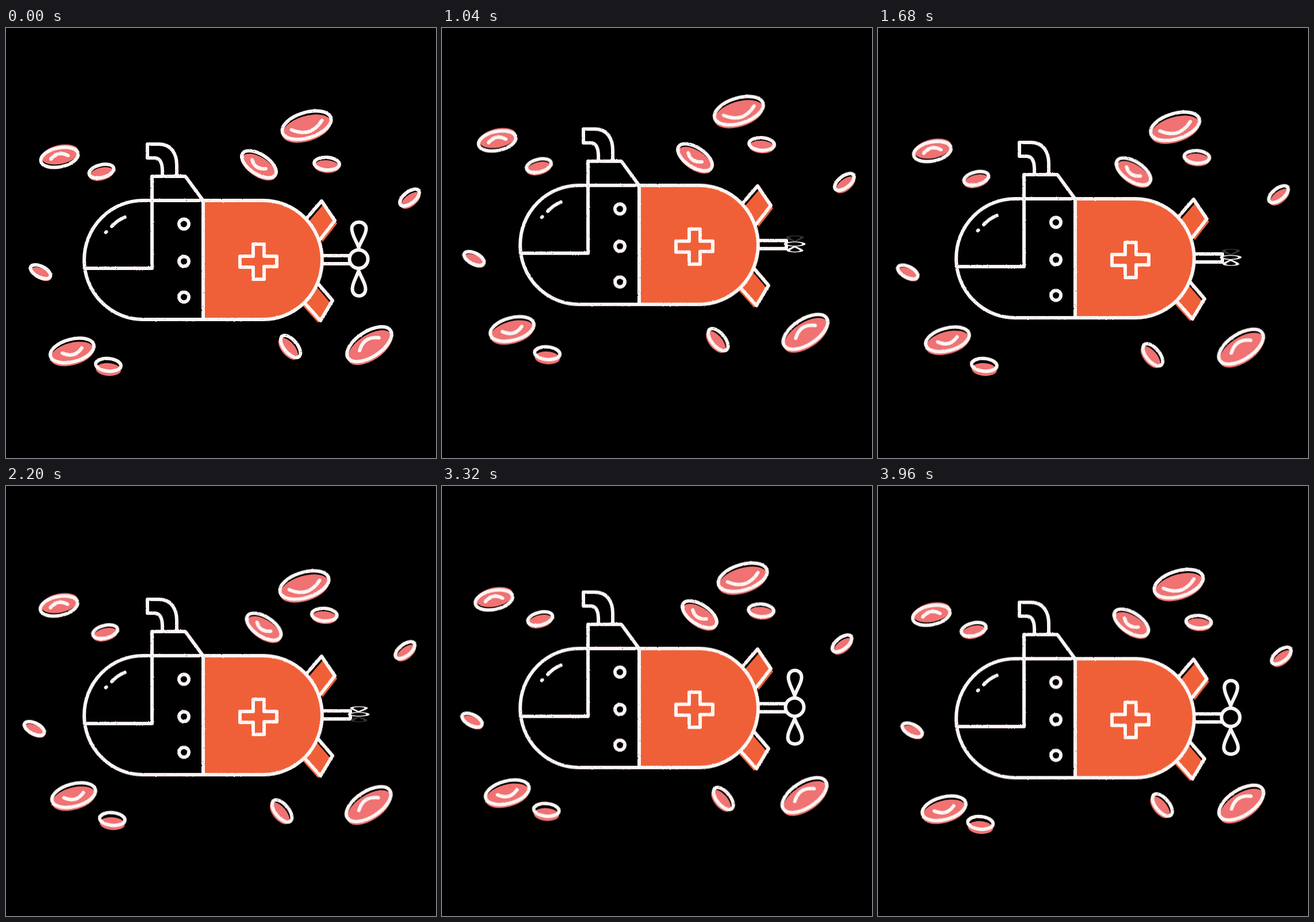
Recreate the animation shown at these times as an HTML page. Size 748 px wide and 748 px high, loop 4 s.

```html
<!DOCTYPE html>
<html lang="en">
<head>
<meta charset="utf-8">
<title>Submarine</title>
<style>
  html, body { margin: 0; width: 100%; height: 100%; overflow: hidden; background: #000; }
  #stage { position: absolute; inset: 0; overflow: hidden; contain: strict; }
  svg { position: absolute; left: 0; top: 0; width: 748px; height: 748px; }
  .layer { will-change: transform; }
  .line { fill: none; stroke: #fdf6f5; stroke-width: 6; stroke-linejoin: round; stroke-linecap: round; }
  .chalk { filter: url(#chalk); }
  .orange { fill: #f06038; }
  .pink { fill: #f07272; }
</style>
</head>
<body>
<div id="stage">
<svg viewBox="0 0 748 748">
  <filter id="chalk" x="-20%" y="-20%" width="140%" height="140%" color-interpolation-filters="sRGB">
    <feTurbulence type="fractalNoise" baseFrequency=".3" numOctaves="2" seed="4" result="wobble"/>
    <feDisplacementMap in="SourceGraphic" in2="wobble" scale="2" xChannelSelector="R" yChannelSelector="G" result="rough"/>
    <feTurbulence type="fractalNoise" baseFrequency=".55" numOctaves="2" seed="9"/>
    <feColorMatrix values="0 0 0 0 0  0 0 0 0 0  0 0 0 0 0  10 0 0 0 -7.4" result="grain"/>
    <feComposite in="rough" in2="grain" operator="out"/>
  </filter>
</svg>
</div>
<script>
const LOOP = 4000, STEP = 40, SPIN_STEPS = 16;
const stage = document.getElementById('stage');

function layer(markup, cls = 'layer') {
  stage.insertAdjacentHTML('beforeend', `<svg viewBox="0 0 748 748" class="${cls}">${markup}</svg>`);
  return stage.lastElementChild;
}

const line = d => `<path d="${d}"/>`;
const porthole = y => `<circle cx="309.5" cy="${y}" r="8.5"/>`;

const topFin = 'M523 331 L549 301 L572 335 L547 367';
const lowFin = 'M544 446 L568 474 L547 509 L520 479';

const sub = layer(`
  <g class="orange">
    <path d="${topFin}" transform="translate(4 5)"/>
    <path d="${lowFin}" transform="translate(-4 4)"/>
  </g>
  <g class="line chalk">${line(topFin)}${line(lowFin)}</g>
  <path class="orange" d="M345 300 H448 A102 103.5 0 0 1 448 507 H345Z"/>
  <g class="line chalk">
    ${line('M238 300 H448 A102 103.5 0 0 1 448 507 H238 A102 103.5 0 0 1 238 300Z')}
    ${line('M343 301 V506')}
    ${line('M138 418 H254 V258 H312 L342 299')}
    ${line('M272 256 C273 236 269 226 258 226 H246 V202 H266 C288 202 297 220 297 238 V256')}
    ${[341, 406, 468].map(porthole).join('')}
    ${line('M184 345 Q194 334 207 329 M173.5 355.5 l1 -1')}
    ${line('M430 376 H449 V397 H471 V415 H449 V437 H430 V416 H407 V397 H430Z')}
    ${line('M553 396 H599 V410 H553')}
  </g>`);

const propeller = layer(`
  <g class="line">
    <g>
      ${line('M0 -20 C-5 -34 -12 -42 -12 -53 C-12 -68 13 -68 13 -53 C13 -42 5 -34 0 -20Z')}
      ${line('M0 20 C-5 34 -11 42 -11 52 C-11 68 12 68 12 52 C12 42 5 34 0 20Z')}
      <circle r="16" fill="#000"/>
    </g>
  </g>`, '').querySelector('.line g');
const [bladeA, bladeB] = propeller.children;

// shine is the signed half width of the inner arc: positive smiles, negative frowns
function cell({ at: [x, y], r, tilt, shift: [sx, sy], shine, arch, sway }) {
  const oval = `<ellipse rx="${r}" ry="${r / 2}"/>`;
  const half = Math.abs(shine || 0) * r;
  const arc = shine ? line(`M${-half} 0 Q0 ${shine * r * 0.85} ${half} 0`) : '';
  const node = layer(`
    <g class="pink" transform="translate(${x + sx} ${y + sy}) rotate(${tilt})">${oval}</g>
    <g class="line chalk"><g transform="translate(${x} ${y}) rotate(${tilt})">${oval}${arc}</g></g>`);
  return { node, arch, sway };
}

const cells = [
  { at: [523, 169], r: 44, tilt: -17, shift: [0, 6], shine: 0.63, arch: [-5, 7], sway: [-3, -4] },
  { at: [440, 237], r: 34, tilt: 33, shift: [0, 5], shine: 0.42, arch: [7, 14], sway: [-5, 4] },
  { at: [558, 236], r: 22, tilt: 4, shift: [0, 5], arch: [-4, -8], sway: [1, -2] },
  { at: [702, 295], r: 20, tilt: -38, shift: [2, 5], arch: [-7, -4], sway: [3, 2] },
  { at: [93, 225], r: 33, tilt: -12, shift: [1, -5], shine: -0.46, arch: [0, -10], sway: [3, 5] },
  { at: [166, 249], r: 22, tilt: -14, shift: [0, 5], arch: [6, 12], sway: [-2, 8] },
  { at: [60, 424], r: 19, tilt: 27, shift: [1, 4], arch: [-10, 3], sway: [3, 1] },
  { at: [115, 561], r: 39, tilt: -15, shift: [0, 6], shine: 0.45, arch: [4, -18], sway: [4, 2] },
  { at: [178, 586], r: 22, tilt: 5, shift: [0, 8], arch: [7, 0], sway: [0, 6] },
  { at: [495, 554], r: 23, tilt: 50, shift: [-4, 4], arch: [-16, 17], sway: [-3, 2] },
  { at: [632, 550], r: 44, tilt: -33, shift: [1, 6], shine: -0.46, arch: [-1, 8], sway: [1, -1] },
].map(cell);

// A blade darkens as it turns away to the back
function shade(depth) {
  const dark = Math.min(1, Math.max(0, (depth - 0.7) / 0.25));
  const level = Math.round(250 * (1 - 0.78 * dark));
  return `rgb(${level},${level - 5},${level - 5})`;
}

function draw(now) {
  const frame = Math.floor((now % LOOP) / STEP);
  const t = frame * STEP;
  const bob = 14 * Math.cos(2 * Math.PI * (t + 90) / 2000) - 13.45;
  sub.style.transform = `translateY(${bob}px)`;

  // Three turns per spin cycle, starting slow and ending fast
  const n = frame % SPIN_STEPS;
  const degrees = 1080 * n / SPIN_STEPS - 35 * Math.sin(Math.PI * n / SPIN_STEPS);
  const angle = degrees * Math.PI / 180;
  propeller.setAttribute('transform', `translate(613.5 ${402 + bob}) scale(1 ${Math.cos(angle)})`);
  bladeA.style.stroke = shade(-Math.sin(angle));
  bladeB.style.stroke = shade(Math.sin(angle));

  const rise = Math.sin(Math.PI * t / LOOP), swing = Math.sin(2 * Math.PI * t / LOOP);
  for (const { node, arch, sway } of cells) {
    const [dx, dy] = arch.map((a, i) => a * rise + sway[i] * swing);
    node.style.transform = `translate(${dx}px, ${bob + dy}px)`;
  }
}

const start = performance.now();
function tick() {
  draw(performance.now() - start);
  requestAnimationFrame(tick);
}
tick();
</script>
</body>
</html>
```
